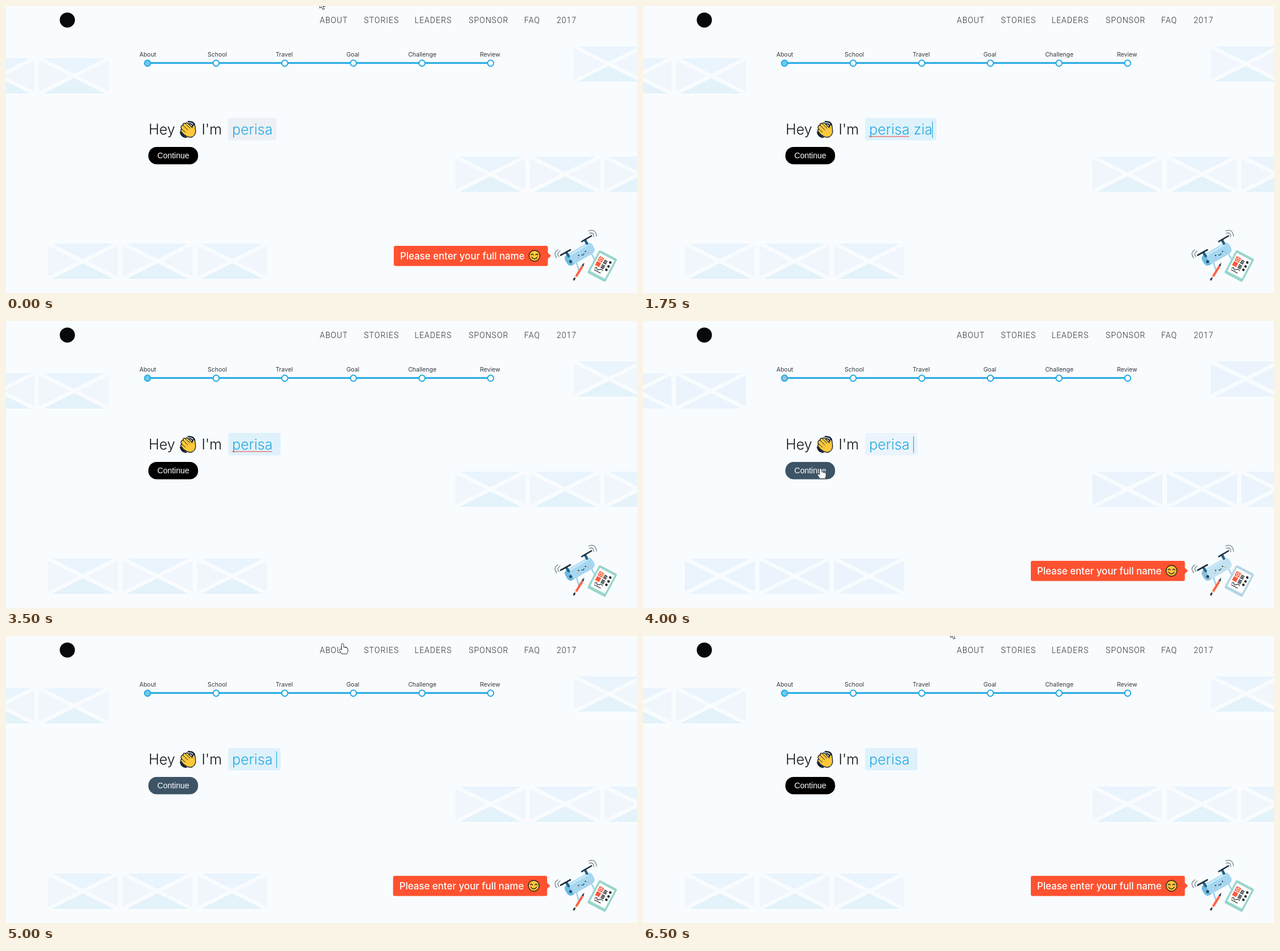
Recreate the animation shown at these times as an HTML page. Size 1108x505 px, loop 6.75 s.

```html
<!DOCTYPE html>
<html lang="en">
<head>
<meta charset="utf-8">
<title>Sign-up form</title>
<style>
  html, body { margin: 0; width: 100%; height: 100%; overflow: hidden; background: #f9fcff; }
  svg { display: block; width: 1108px; height: 505px; font-family: Inter, sans-serif;
    --top: #e9f4fd; --side: #f0f6fb; --bottom: #e4f2fa; --body: #a5d7f0; --shade: #6dbbe2; --teal: #9ad5cc; --dot: #6ccaec; }
  svg.muted { --top: #ebf4fc; --side: #ebf4fc; --bottom: #ebf4fc; --body: #c3e2f1; --shade: #8cbfd9; --teal: #b4d6e4; --dot: #8fc3df; }
  .nav { font: 300 14px Roboto, sans-serif; letter-spacing: 1px; fill: #26282b; }
  .label { font-size: 10.5px; fill: #34383c; text-anchor: middle; }
  .big { font-size: 25px; font-weight: 300; fill: #111; }
  #name { fill: #29a9e1; white-space: pre; }
  .button { font: 14px "Liberation Sans", Arial, sans-serif; fill: #fff; }
  .bubble { font-size: 16.8px; font-weight: 500; fill: #fff; }
  .line { fill: none; stroke-linecap: round; stroke-linejoin: round; }
</style>
</head>
<body>
<svg id="stage" viewBox="0 0 1108 505">
  <defs>
    <g id="tile">
      <path d="M0 0H123L61.5 31Z" fill="var(--top)"/>
      <path d="M0 0L123 62V0L0 62Z" fill="var(--side)"/>
      <path d="M0 62H123L61.5 31Z" fill="var(--bottom)"/>
      <path d="M0 0L123 62M123 0L0 62" stroke="#f9fcff" stroke-width="6.5"/>
    </g>
  </defs>
  <rect width="1108" height="505" fill="#f9fcff"/>
  <g id="tiles"></g>
  <circle cx="107.7" cy="24.7" r="13.3" fill="#08090b"/>
  <g id="nav" class="nav"></g>
  <path d="M248.5 100.2H851" stroke="#1fa8e1" stroke-width="3"/>
  <g id="steps"></g>

  <text class="big" x="250.5" y="226">Hey</text>
  <g class="line" stroke="#101c2e" stroke-width="1.3">
    <path d="M308 212Q308 209 311 210L311 208Q312 205 315 207Q317 204 320 207L327 214L327 210Q330 207 332 211L333 221Q332 230 324 231Q317 231 311 225L307 220Q306 217 309 217Q306 214 308 212Z" fill="#ffc83a"/>
    <path d="M311 210L319 218M315 207L323 215M309 217L315 222" stroke-width="1"/>
    <path d="M320 203.5Q329 203 331 209M306.5 222Q308 230 316 231" stroke-width="2.6"/>
    <path d="M322 207Q326 207 328 211M308 224Q311 228 315 228" stroke-width="2"/>
  </g>
  <text class="big" x="343.5" y="226">I'm</text>

  <rect id="field" x="390" y="197" height="39.5" rx="4"/>
  <text id="name" class="big" x="397" y="226" xml:space="preserve"></text>
  <path id="squiggle" class="line" stroke="#ec3b35" stroke-width="1"/>
  <path id="caret" stroke="#29a9e1" stroke-width="1.2" d="M0 203V232"/>

  <rect id="button" x="250" y="248" width="87.3" height="30.5" rx="14.5"/>
  <text class="button" x="265.8" y="268">Continue</text>

  <g id="bubble">
    <path d="M950 433L957 439.5L950 446Z" fill="#ff5230"/>
    <rect x="681" y="422" width="270.5" height="35.5" rx="3" fill="#ff5230"/>
    <text class="bubble" x="692" y="445.5">Please enter your full name</text>
    <g class="line" stroke="#2b2116" stroke-width="1.4">
      <circle cx="928" cy="439.5" r="9.5" fill="#ffca3d"/>
      <path d="M922 438q2-3 4 0m4 0q2-3 4 0M923 442q5 6 10 0"/>
    </g>
    <path d="M921.5 441h2.4m8.2 0h2.4" stroke="#f58a50" stroke-width="2"/>
  </g>

  <g class="line">
    <path d="M1000 446L1006 465M1027 434L1033 445" stroke="#9fd3ec" stroke-width="2.6"/>
    <g transform="translate(1007.5 436.5) rotate(-30)">
      <rect x="-27.5" y="-10.5" width="55" height="21" rx="8" fill="var(--body)"/>
      <path d="M-20 -10.5Q-27.5 -10 -27.5 -3V3Q-27.5 10.5 -20 10.5H-17Q-20 4 -18 -3Z" fill="var(--shade)"/>
      <path d="M-17 -7.5H20" stroke="#c7e8f7" stroke-width="3.5"/>
      <circle cx="-20.5" cy="3.5" r="2.6" fill="#21495f"/>
      <path d="M-3 1h.1M11 1h.1" stroke="#173449" stroke-width="2.2"/>
      <path d="M2 3q2.5 2.5 5 0" stroke="#173449" stroke-width="1.1"/>
      <path d="M-6 4.5h1M14 4.5h1" stroke="#f2a2a0" stroke-width="1.8"/>
    </g>
    <path d="M984 434L988 440M1017 412L1020 418" stroke="#266184" stroke-width="4.5"/>
    <path d="M974 438.5L991 429M1011 414.5L1028 404.5" stroke="#1e313f" stroke-width="2.6"/>
    <path d="M969 429Q960 435 967 443M973 431Q966 436 971 441M1023 396Q1035 391 1037 405M1024 400Q1032 397 1032 406" stroke="#75818a" stroke-width="1.3"/>

    <g transform="translate(1047 457.5) rotate(28)">
      <rect x="-18" y="-23" width="36" height="46" rx="3" fill="var(--teal)"/>
      <rect x="-14.5" y="-18.5" width="29" height="36" fill="#fff"/>
      <rect x="-12" y="-13.5" width="8.5" height="8.5" fill="#ff5a3d"/>
      <circle cx="-7.7" cy="-9.2" r="2.3" stroke="#fff"/>
      <rect x="-12" y="-3.5" width="8" height="8" fill="#ff5a3d"/>
      <path d="M-1 -11h5M-1 -8.5h5M-1 -6h5M-1 -2h5M-1 .5h5M-1 3h5" stroke="#20272c" stroke-width="1.6"/>
      <path d="M9.5 -12h.1M10 -4.5h.1M9.5 2.5h.1" stroke="#20272c" stroke-width="4.4"/>
      <path d="M-10 9.5q3-4 4-1t5-1 5 0M-9 12.5H3" stroke="#20272c" stroke-width="1.2"/>
    </g>
    <path d="M1012 458L1001 476" stroke="#ff6242" stroke-width="4" stroke-linecap="butt"/>
    <path d="M1010.5 456.5L1015.5 451.5L1014 458.5Z" fill="#28353d"/>
    <path d="M1001 475.5L999 479" stroke="#f3d8bd" stroke-width="4" stroke-linecap="butt"/>
    <path d="M998.4 479.5L997.2 481.5" stroke="#263d4c" stroke-width="3.2"/>
  </g>

  <g id="cursor" fill="#fff" stroke="#333" stroke-width="1" stroke-linejoin="round">
    <path id="arrow" d="M0 0V13L3 10.4L5.4 15.4L8 14.2L5.6 9.5H9.8Z"/>
    <path id="hand" d="M-2 1.5Q0 -1 2 1.5V7Q4 5.5 5 7.6Q7 6.6 7.6 8.6Q9.4 8 9.4 10V14L7.6 18.5H-1.5L-6 11.5Q-5 8.5 -2 11.5Z"/>
  </g>
</svg>
<script>
const LOOP = 6750;
const $ = id => document.getElementById(id);
const stage = $("stage");

function add(parent, tag, attrs, text = "") {
  const el = document.createElementNS("http://www.w3.org/2000/svg", tag);
  for (const key in attrs) el.setAttribute(key, attrs[key]);
  el.textContent = text;
  parent.append(el);
}

// Each row of tiles: left edge, top edge, count
for (const [x, y, count] of [[-73, 92, 2], [997, 71, 1], [789, 265, 3], [73.5, 418, 3]])
  for (let i = 0; i < count; i++) add($("tiles"), "use", { href: "#tile", x: x + i * 131, y });

Object.entries({ ABOUT: 551, STORIES: 628.5, LEADERS: 717.5, SPONSOR: 812.5, FAQ: 910, 2017: 967 })
  .forEach(([label, x]) => add($("nav"), "text", { x, y: 29.7 }, label));

Object.entries({ About: 249, School: 371, Travel: 488.5, Goal: 609, Challenge: 731, Review: 850 })
  .forEach(([label, x], i) => {
    add($("steps"), "text", { class: "label", x, y: 89 }, label);
    add($("steps"), "circle", { cx: 248.5 + i * 120.5, cy: 100.6, r: 5.3, stroke: "#1fa8e1", "stroke-width": 2, fill: i ? "#fff" : "var(--dot)" });
  });

let wave = "M397 229";
for (let i = 1; i <= 35; i++) wave += `L${397 + i * 2} ${229 + (i % 2 ? 1.4 : 0)}`;
$("squiggle").setAttribute("d", wave);

// Every step keeps the values it does not mention
const steps = [
  { at: 0, name: "perisa", field: "#edf1f6", bubble: 1, shift: 0, caret: 0, squiggle: 0, button: "#000", muted: 0, cursor: ["arrow", 551, -9] },
  { at: 250, cursor: null },
  { at: 1000, field: "#dff2fb", caret: 1 },
  { at: 1250, name: "perisa ", bubble: 0, squiggle: 1 },
  { at: 1500, name: "perisa z" },
  { at: 1750, name: "perisa zia" },
  { at: 2250, name: "perisa zi" },
  { at: 2500, name: "perisa z" },
  { at: 2750, name: "perisa " },
  { at: 3250, caret: 0 },
  { at: 3750, caret: 1, button: "#3c5466", cursor: ["hand", 315, 264] },
  { at: 4000, field: "#ebf4fc", squiggle: 0, bubble: 1, muted: 1, cursor: ["hand", 312, 259] },
  { at: 4500, caret: 0 },
  { at: 4750, field: "#dff2fb", muted: 0, cursor: ["arrow", 440, 150] },
  { at: 5000, caret: 1, shift: -1.3, cursor: ["hand", 591, 13] },
  { at: 5250, shift: 0, button: "#000", cursor: ["arrow", 577, -5] },
  { at: 5500, caret: 0, cursor: ["arrow", 566, -7] },
  { at: 5750, cursor: ["arrow", 557, -8] },
  { at: 6000, caret: 1, cursor: ["arrow", 550, -9] },
  { at: 6250, cursor: ["arrow", 544, -9] },
  { at: 6500, caret: 0, cursor: ["arrow", 540, -10] }
];

const show = (id, on) => { $(id).style.display = on ? "" : "none"; };

function draw(time) {
  const s = Object.assign({}, ...steps.filter(step => step.at <= time));
  $("name").textContent = s.name;
  const width = $("name").getComputedTextLength();
  $("field").setAttribute("width", width + 14);
  $("field").setAttribute("fill", s.field);
  $("caret").setAttribute("transform", `translate(${397 + width})`);
  $("button").setAttribute("fill", s.button);
  $("bubble").setAttribute("transform", `translate(${s.shift})`);
  stage.classList.toggle("muted", !!s.muted);
  for (const id of ["bubble", "caret", "squiggle", "cursor"]) show(id, s[id]);
  if (s.cursor) {
    const [shape, x, y] = s.cursor;
    show("arrow", shape === "arrow");
    show("hand", shape === "hand");
    $("cursor").setAttribute("transform", `translate(${x} ${y})`);
  }
}

function frame() {
  draw(performance.now() % LOOP);
  requestAnimationFrame(frame);
}
frame();
</script>
</body>
</html>
```
